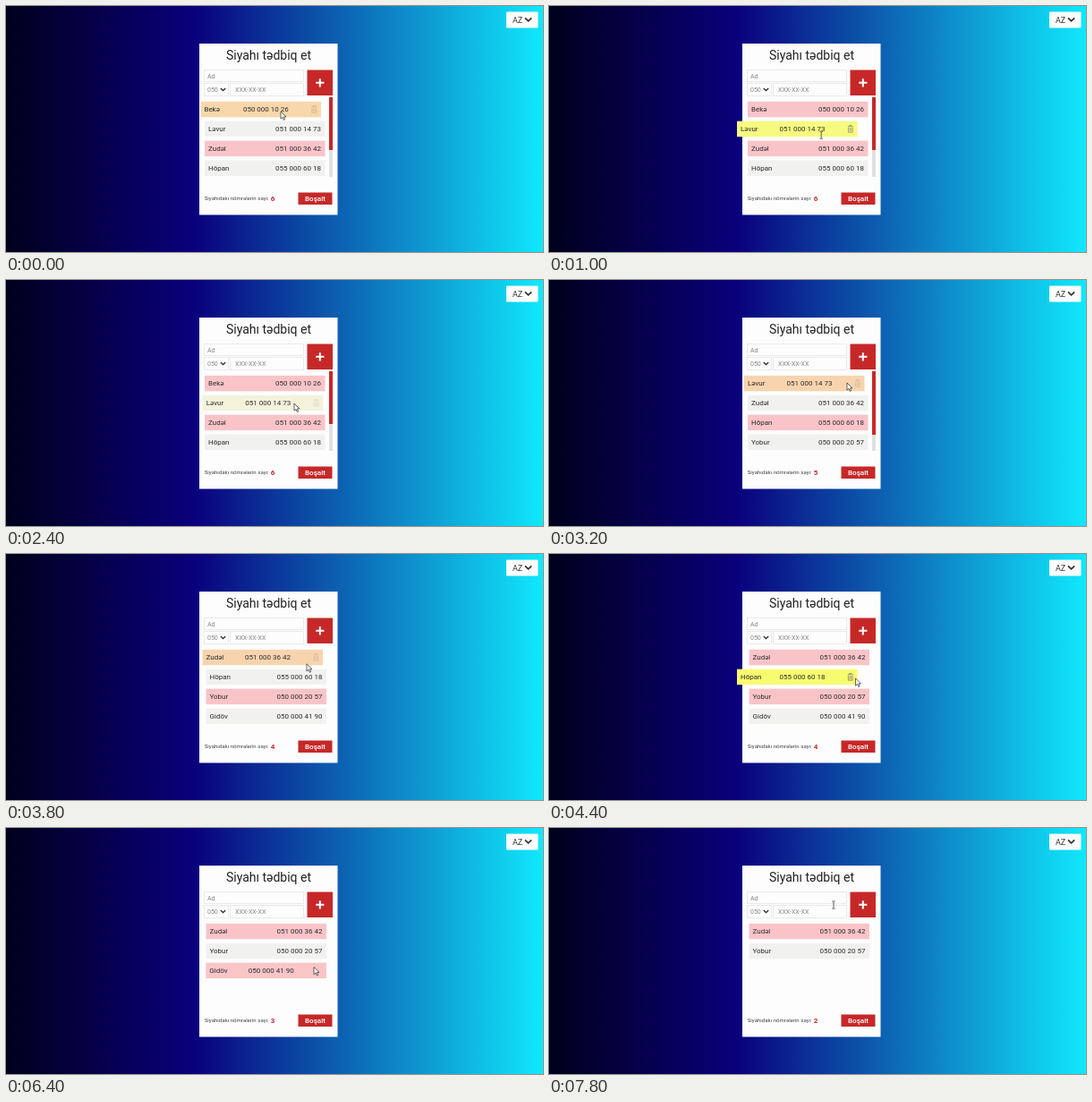
An HTML page for the animation above (8 s loop, 600 by 275 pixels).

```html
<!DOCTYPE html>
<html lang="az">
<head>
<meta charset="utf-8">
<title>Siyahı</title>
<style>
  html, body { margin: 0; width: 100%; height: 100%; overflow: hidden; }
  svg { display: block; width: 100vw; height: 100vh; font-family: Roboto, sans-serif; }
  .field { fill: #fdfdfd; stroke: #e2e2e2; stroke-width: .7; }
  .hint { fill: #858585; font-size: 7px; }
  .red { fill: #c62828; }
  .chevron { fill: none; stroke: #333; }
  .row text { font-size: 8px; fill: #2b2b2b; }
</style>
</head>
<body>
<svg viewBox="0 0 600 275">
  <defs>
    <linearGradient id="sky">
      <stop offset="0" stop-color="#00001c"/>
      <stop offset=".35" stop-color="#0a007c"/>
      <stop offset="1" stop-color="#10e8fc"/>
    </linearGradient>
  </defs>
  <rect width="600" height="275" fill="url(#sky)"/>

  <rect x="559" y="6.5" width="35.5" height="18" rx="1" fill="#fdfdfd"/>
  <text x="566" y="18.5" font-size="9" fill="#333">AZ</text>
  <path class="chevron" d="M580 13.3l3.6 3.5 3.6-3.5" stroke-width="1.8"/>

  <rect x="216" y="42" width="154.5" height="191.5" fill="#fdfdfd"/>
  <text x="293.5" y="60" font-size="14" text-anchor="middle" fill="#222">Siyahı tədbiq et</text>

  <rect class="field" x="221.5" y="71.5" width="111" height="13"/>
  <rect class="field" x="221.5" y="86.5" width="27" height="14"/>
  <rect class="field" x="250.5" y="86.5" width="82" height="14"/>
  <text class="hint" x="225" y="80.5">Ad</text>
  <text class="hint" x="225" y="95.7">050</text>
  <text class="hint" x="256" y="95.7">XXX-XX-XX</text>
  <path class="chevron" d="M239.8 92l2.7 2.6 2.7-2.6" stroke-width="1.4"/>
  <rect class="red" x="336.5" y="71.5" width="28.5" height="28.5"/>
  <path d="M346.2 85.8h9.2M350.8 81.2v9.2" stroke="#fff" stroke-width="2"/>

  <g id="scrollbar">
    <rect x="361" y="102" width="4" height="89" fill="#e0e0e0"/>
    <rect id="thumb" class="red" x="361" y="102" width="4" height="59"/>
  </g>

  <text x="221.7" y="217.3" font-size="6.1" fill="#444">Siyahıdakı nömrələrin sayı:</text>
  <text id="count" class="red" x="295.7" y="217.5" font-size="8" font-weight="700"></text>
  <rect class="red" x="326.5" y="208.5" width="38" height="13.5"/>
  <text x="345.5" y="217.8" font-size="8.1" font-weight="500" text-anchor="middle" fill="#fff">Boşalt</text>

  <g id="list"></g>
  <g id="cursor">
    <path id="arrow" d="M0 0v8.2l2-1.8 1.3 3 1.4-.6-1.3-2.9h2.6z" fill="#fff" stroke="#222" stroke-width=".7"/>
    <path id="beam" d="M-1.7-4h1.2l.5.4.5-.4h1.2M0-3.6v7.2M-1.7 4h1.2l.5-.4.5.4h1.2" fill="none" stroke="#333" stroke-width=".8"/>
  </g>
</svg>
<script>
const LOOP = 8000, TICK = 200, VISIBLE = 4, PITCH = 21.9;
const HOVER_MS = 500, HOVER_SHIFT = -13.5;
const PINK = [249, 196, 200], GREY = [241, 241, 239], YELLOW = [247, 251, 112];

// name, number, time of removal
const people = [
  ['Bekə', '050 000 10 26', 3100],
  ['Ləvur', '051 000 14 73', 3700],
  ['Zudəl', '051 000 36 42', 5000],
  ['Höpan', '055 000 60 18', 5000],
  ['Yobur', '050 000 20 57', Infinity],
  ['Gidöv', '050 000 41 90', 7400]
];
people[2][2] = Infinity;

// person, start, end
const hovers = [
  [0, -110, 700], [1, 700, 1080], [2, 1080, 1500], [3, 1715, 2150],
  [2, 2150, 2330], [1, 2330, 2500], [0, 2500, 3100], [1, 3100, 3700],
  [2, 3700, 3900], [3, 3900, 5000], [4, 5000, 5300], [5, 6390, 7400]
];

// time, x, y of the pointer tip
const path = [
  [0, 307, 118], [600, 307, 118], [900, 305, 138], [1250, 302, 160],
  [1800, 297, 180.5], [2000, 297, 181], [2400, 322, 138], [2700, 333, 115],
  [3700, 333, 115], [4000, 342, 138.5], [4400, 342.5, 139], [4800, 337, 138],
  [5000, 337, 138], [5400, 344.5, 148.5], [6200, 344.5, 149],
  [6400, 344, 155.5], [6900, 334, 160], [7400, 334, 160],
  [7600, 324, 118], [7800, 318, 86]
];
const beams = [[700, 2300], [7700, LOOP]];

const $ = id => document.getElementById(id);
const within = (t, [from, to]) => t >= from && t < to;
const mix = (a, b, k) => `rgb(${a.map((v, i) => Math.round(v + (b[i] - v) * k))})`;

// CSS "ease": cubic-bezier(.25, .1, .25, 1)
function ease(x) {
  if (x <= 0) return 0;
  if (x >= 1) return 1;
  let lo = 0, hi = 1, s;
  for (let i = 0; i < 20; i++) {
    s = (lo + hi) / 2;
    const bx = .75 * s * (1 - s) + s ** 3;
    if (bx < x) lo = s; else hi = s;
  }
  return .3 * s * (1 - s) ** 2 + 3 * s * s * (1 - s) + s ** 3;
}

function pointerAt(t) {
  const i = path.findIndex(p => p[0] > t);
  if (i < 0) return path[path.length - 1].slice(1);
  const [t0, x0, y0] = path[i - 1], [t1, x1, y1] = path[i];
  const k = (t - t0) / (t1 - t0);
  return [x0 + (x1 - x0) * k, y0 + (y1 - y0) * k];
}

const rows = people.map(([name, number]) => {
  const g = document.createElementNS('http://www.w3.org/2000/svg', 'g');
  g.setAttribute('class', 'row');
  g.innerHTML = `<rect width="134.5" height="17.5"/>
    <text x="4" y="11">${name}</text>
    <text y="11">${number}</text>
    <path d="M123.8 6h6M125.6 6v-1.2h2.4v1.2M124.4 7v5.5h4.8v-5.5M126 7.5v4M127.6 7.5v4"
      fill="none" stroke="#777" stroke-width=".7"/>`;
  $('list').append(g);
  const [box, , phone, bin] = g.children;
  return { g, box, phone, bin };
});

function drawRow(row, slot, left, hover, t) {
  const k = hover ? ease((t - hover[1]) / HOVER_MS) : 0;
  row.g.setAttribute('transform', `translate(${left + HOVER_SHIFT * k} ${106.8 + slot * PITCH})`);
  row.box.setAttribute('fill', mix(slot % 2 ? GREY : PINK, YELLOW, k));
  row.phone.setAttribute('x', hover ? 47.5 : 130);
  row.phone.setAttribute('text-anchor', hover ? 'start' : 'end');
  row.bin.setAttribute('opacity', k);
}

function draw(t) {
  const alive = people.map((p, i) => i).filter(i => t < people[i][2]);
  const scrolls = alive.length > VISIBLE;
  const hover = hovers.find(h => within(t, h.slice(1)));
  rows.forEach((row, i) => {
    const slot = alive.indexOf(i), shown = slot >= 0 && slot < VISIBLE;
    row.g.style.display = shown ? '' : 'none';
    if (shown) drawRow(row, slot, scrolls ? 222 : 223.5, hover && hover[0] === i ? hover : null, t);
  });
  $('count').textContent = alive.length;
  $('scrollbar').style.display = scrolls ? '' : 'none';
  $('thumb').setAttribute('height', alive.length === 6 ? 59 : 71);

  const beam = beams.some(b => within(t, b));
  $('cursor').setAttribute('transform', `translate(${pointerAt(t)})`);
  $('arrow').style.display = beam ? 'none' : '';
  $('beam').style.display = beam ? '' : 'none';
}

const start = performance.now();
function frame(now) {
  const t = Math.max(0, now - start) % LOOP;
  draw(Math.floor(t / TICK) * TICK);
  requestAnimationFrame(frame);
}
draw(0);
requestAnimationFrame(frame);
</script>
</body>
</html>
```
